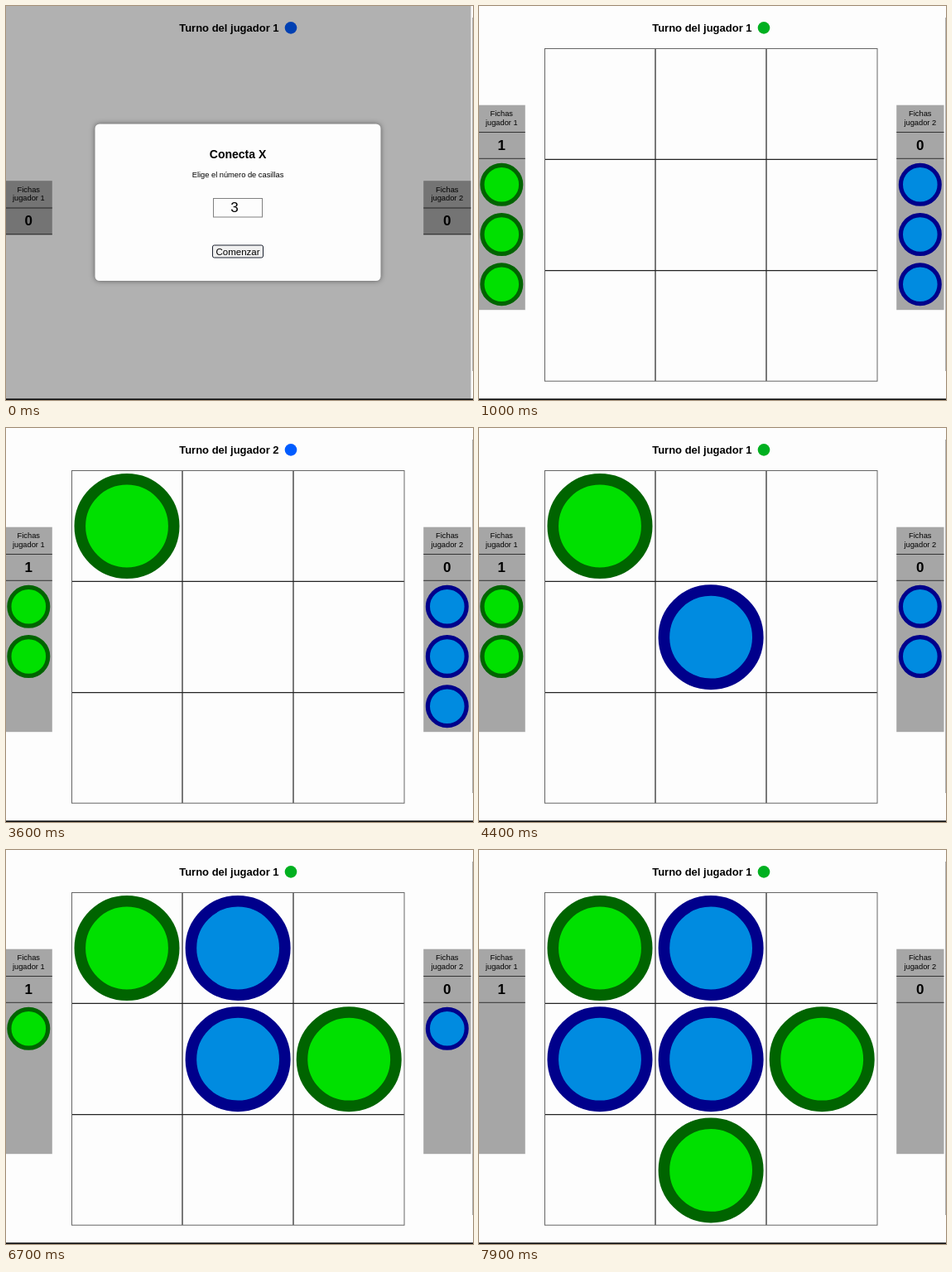
Write an HTML page that moves like this. It is 564 px wide and 476 px high and loops after 8000 ms.

```html
<!DOCTYPE html>
<html lang="es">
<head>
<meta charset="utf-8">
<title>Conecta X</title>
<style>
  html, body { margin: 0; width: 100%; height: 100%; overflow: hidden; background: #fdfdfd; }
  svg { display: block; width: 564px; height: 476px; }
  text { font-family: "Liberation Sans", Arial, sans-serif; fill: #000; }
  .bold { font-weight: bold; }
  .mid { text-anchor: middle; }
  .small { font-size: 9.3px; }
  .big { font-size: 17px; }
  .p1 { fill: #00e000; stroke: #006400; }
  .p2 { fill: #008be0; stroke: #00008b; }
  .modal { filter: drop-shadow(0 0 3px rgba(0, 0, 0, .5)); }
</style>
</head>
<body>
<svg id="stage" viewBox="0 0 564 476">
  <rect width="564" height="476" fill="#fdfdfd"/>
  <text id="turn" class="bold" x="209.2" y="31" font-size="13"></text>
  <circle id="dot" cx="344" cy="26.4" r="7.3"/>
  <g id="trays"></g>
  <g id="board">
    <path d="M213 51.5V453M347 51.5V453M79.5 185.3H481M79.5 319.7H481" stroke="#222" stroke-width="1.2"/>
    <rect x="79.5" y="51.5" width="401.5" height="401.7" fill="none" stroke="#666"/>
  </g>
  <g id="dialog">
    <rect width="561.5" height="476" fill="#000" opacity=".3"/>
    <rect class="modal" x="107.5" y="142.5" width="345" height="189.5" rx="5.5" fill="#fdfdfd"/>
    <text class="bold mid" x="280" y="184" font-size="14">Conecta X</text>
    <text class="mid small" x="280" y="206.7">Elige el número de casillas</text>
    <rect x="250.5" y="232.5" width="59" height="22.5" fill="#fdfdfd" stroke="#808080"/>
    <text class="mid big" x="276" y="249.3">3</text>
    <rect x="249.5" y="289" width="61" height="15" rx="2" fill="#f0f0f0" stroke="#1c2230"/>
    <text class="mid" x="280" y="300.6" font-size="11.5">Comenzar</text>
  </g>
  <path d="M563.5 14V441" stroke="#b0b0b0"/>
  <rect y="474.3" width="564" height="1.7" fill="#111"/>
</svg>
<script>
const LOOP = 8000;
const START = 1000;
// time, player, column, row
const MOVES = [
  [2600, 1, 0, 0],
  [3900, 2, 1, 1],
  [4500, 1, 2, 1],
  [5500, 2, 1, 0],
  [6900, 1, 1, 2],
  [7800, 2, 0, 1]
];
const $ = id => document.getElementById(id);

function add(parent, tag, attrs, text = '') {
  const node = document.createElementNS('http://www.w3.org/2000/svg', tag);
  for (const key in attrs) node.setAttribute(key, attrs[key]);
  node.textContent = text;
  return parent.appendChild(node);
}

function addPiece(parent, player, cx, cy, radius, ring) {
  return add(parent, 'circle', {
    class: 'p' + player, cx, cy, r: radius - ring / 2, 'stroke-width': ring
  });
}

function show(node, visible) {
  node.style.display = visible ? '' : 'none';
}

function makeTray(player, x, width, cx) {
  const group = add($('trays'), 'g', {});
  const panel = add(group, 'rect', { x, y: 119.7, width, fill: '#a6a6a6' });
  const label = (y, text, cls) => add(group, 'text', { x: cx, y, class: 'mid ' + cls }, text);
  label(133.3, 'Fichas', 'small');
  label(143.7, 'jugador ' + player, 'small');
  const score = label(173.7, '0', 'big bold');
  for (const y of [152.5, 184.3]) {
    add(group, 'path', { d: `M${x} ${y}h${width}`, stroke: '#333' });
  }
  const pieces = [0, 1, 2].map(i => addPiece(group, player, cx, 215.8 + i * 60.2, 26, 5.2));
  return { player, group, panel, score, pieces };
}

const trays = [makeTray(1, 0, 55.8, 27.3), makeTray(2, 504.2, 57.3, 532.8)];
const placed = MOVES.map(([, player, col, row]) =>
  addPiece($('board'), player, 146 + col * 134.1, 118.5 + row * 134.2, 63.5, 13.6));

function render(time) {
  const playing = time >= START;
  const done = MOVES.filter(([at]) => time >= at);
  const current = done.length % 2 + 1;

  show($('dialog'), !playing);
  show($('board'), playing);
  $('turn').textContent = 'Turno del jugador ' + current;
  $('dot').setAttribute('fill', playing && current === 1 ? '#00b020' : '#005cff');
  placed.forEach((piece, i) => show(piece, i < done.length));

  for (const { player, group, panel, score, pieces } of trays) {
    const left = 3 - done.filter(move => move[1] === player).length;
    group.setAttribute('transform', `translate(0 ${playing ? 0 : 91.5})`);
    panel.setAttribute('height', playing ? 247.5 : 65);
    score.textContent = playing && player === 1 ? 1 : 0;
    pieces.forEach((piece, i) => show(piece, playing && i < left));
  }
}

const origin = performance.now();
function tick() {
  render((performance.now() - origin) % LOOP);
  requestAnimationFrame(tick);
}
tick();
</script>
</body>
</html>
```
